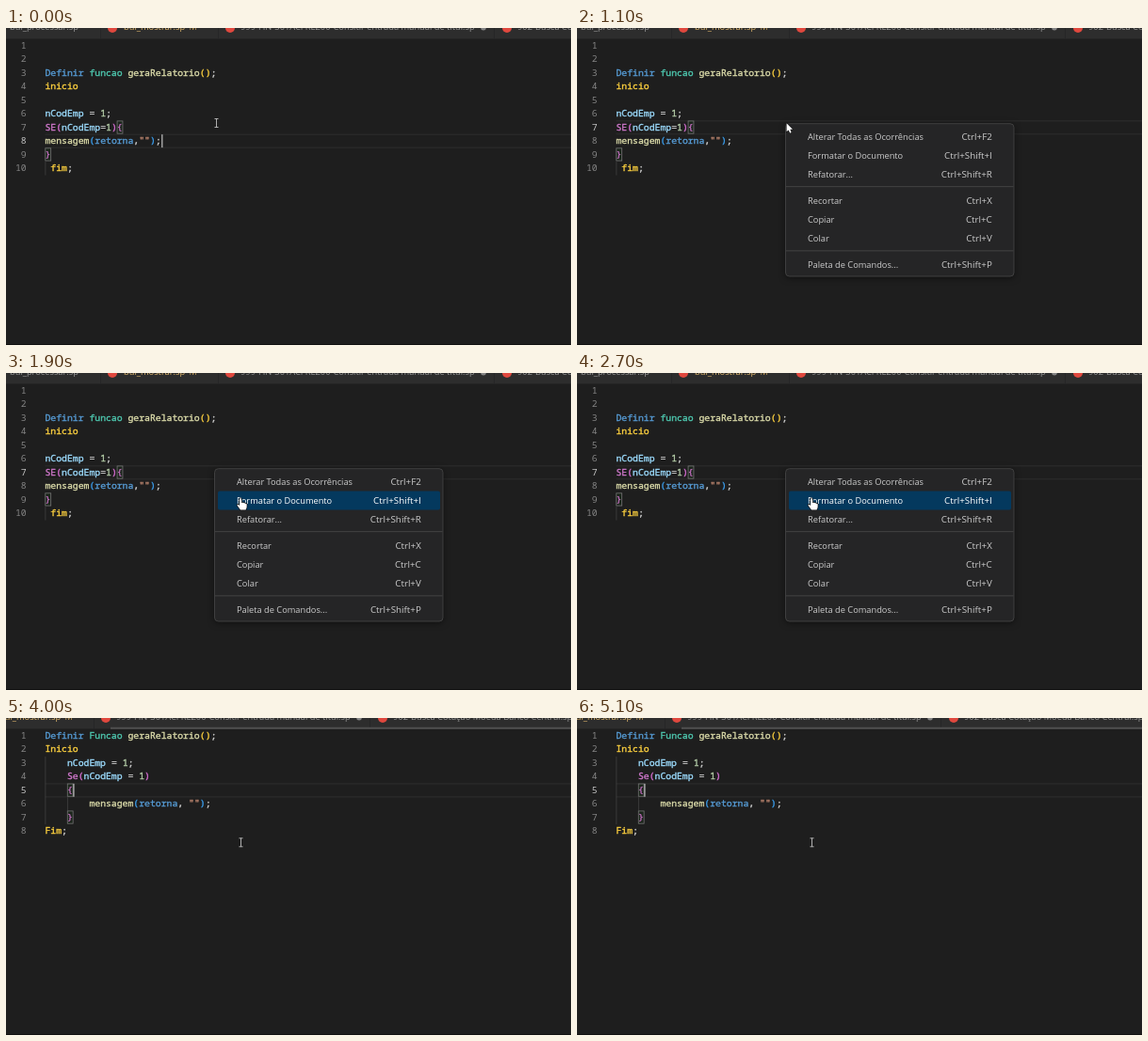
Write an HTML page with a canvas that moves like this. It is 600 by 337 pixels and loops after 5.2 s.

```html
<!DOCTYPE html>
<html lang="pt">
<head>
<meta charset="utf-8">
<style>
html, body { margin: 0; width: 100%; height: 100%; overflow: hidden; background: #1e1e1e; }
canvas { display: block; }
</style>
</head>
<body>
<canvas id="stage" width="600" height="337"></canvas>
<script>
const ctx = document.getElementById('stage').getContext('2d');
const LOOP = 5200, BLUR = 600, MENU_OPEN = 800, FORMAT = 2900;
const LEFT = 41.5, PITCH = 14.45, ADVANCE = 5.867;
const MONO = '9.78px "Noto Sans Mono", monospace';
const ui = size => `${size}px "Open Sans", "Noto Sans", sans-serif`;

const RAW = ['', '', 'Definir funcao geraRelatorio();', 'inicio', '', 'nCodEmp = 1;',
  'SE(nCodEmp=1){', 'mensagem(retorna,"");', '}', ' fim;'];
const TIDY = ['Definir Funcao geraRelatorio();', 'Inicio', '    nCodEmp = 1;',
  '    Se(nCodEmp = 1)', '    {', '        mensagem(retorna, "");', '    }', 'Fim;'];

const BRACKETS = ['#ffd23f', '#da70d6', '#3a9ff0'];
const RULES = [
  [/^(definir|retorna)$/i, '#569cd6'],
  [/^funcao$/i, '#4ec9b0'],
  [/^(geraRelatorio|mensagem)$/, '#dcdcaa'],
  [/^se$/i, '#d078cc'],
  [/^nCodEmp$/, '#9cdcfe'],
  [/^\d+$/, '#b5cea8'],
  [/^"/, '#ce9178'],
];

const MENU = [
  [115.6, 'Alterar Todas as Ocorrências', 'Ctrl+F2'],
  [135.6, 'Formatar o Documento', 'Ctrl+Shift+I'],
  [155.4, 'Refatorar...', 'Ctrl+Shift+R'],
  [183.5, 'Recortar', 'Ctrl+X'],
  [203.4, 'Copiar', 'Ctrl+C'],
  [223.2, 'Colar', 'Ctrl+V'],
  [251.2, 'Paleta de Comandos...', 'Ctrl+Shift+P'],
];

function rect(x, y, w, h, color) {
  ctx.fillStyle = color;
  ctx.fillRect(x, y, w, h);
}

function text(str, x, y, color, font, align = 'left') {
  ctx.font = font;
  ctx.fillStyle = color;
  ctx.textAlign = align;
  ctx.fillText(str, x, y);
}

// Code glyphs get a hairline outline for a slightly heavier weight
function codeText(str, x, y, color) {
  text(str, x, y, color, MONO);
  ctx.strokeStyle = color;
  ctx.lineWidth = 0.35;
  ctx.strokeText(str, x, y);
}

function dot(x, y, r, color) {
  ctx.fillStyle = color;
  ctx.beginPath();
  ctx.arc(x, y, r, 0, Math.PI * 2);
  ctx.fill();
}

function roundRect(x, y, w, h, r) {
  ctx.beginPath();
  ctx.roundRect(x, y, w, h, r);
}

const lineTop = n => 12 + (n - 1) * PITCH;
const columnX = c => LEFT + c * ADVANCE;

function drawTabs(scroll) {
  const font = ui(9.3), idle = '#969696', red = '#e0483e', base = 2;
  rect(0, 0, 600, 11.5, '#2d2d2d');
  ctx.save();
  ctx.translate(-scroll, 0);
  for (const x of [100, 225, 518]) rect(x, 0, 0.8, 11.5, '#252526');
  text('bul_processar.sp', 4, base, idle, font);
  text('bul_mostrar.sp', 125, base, '#dcb46c', font);
  text('M', 194.5, base, '#c09a58', font);
  text('999-FIN-301ACFREZ00-Consitir entrada manual de titul.sp', 249, base, idle, font);
  text('902-Busca Cotação Moeda Banco Central.sp', 543, base, idle, font);
  for (const x of [113, 238, 532]) dot(x, 0, 5, red);
  dot(507, -0.3, 2.8, '#858585');
  ctx.restore();
}

function drawCode(lines, active) {
  const top = lineTop(active);
  rect(LEFT, top - 0.5, 600 - LEFT, 1.2, '#2b2b2b');
  rect(LEFT, top + PITCH - 1, 600 - LEFT, 1.2, '#2b2b2b');
  let depth = 0;
  lines.forEach((line, i) => {
    const base = lineTop(i + 1) + 10;
    text(i + 1, 21.7, base, i + 1 === active ? '#c6c6c6' : '#858585', MONO, 'right');
    for (const { 0: token, index } of line.matchAll(/\w+|"[^"]*"|[^\s\w"]/g)) {
      let color = '#d4d4d4';
      const rule = RULES.find(([pattern]) => pattern.test(token));
      if (rule) color = rule[1];
      else if (/^(inicio|[({])$/i.test(token)) color = BRACKETS[depth++];
      else if (/^(fim|[)}])$/i.test(token)) color = BRACKETS[--depth];
      codeText(token, columnX(index), base, color);
    }
  });
}

function bracketBox(line, col) {
  const x = columnX(col), y = lineTop(line);
  rect(x, y, ADVANCE, PITCH - 1, 'rgba(0,100,0,.1)');
  ctx.strokeStyle = '#757575';
  ctx.lineWidth = 0.8;
  ctx.strokeRect(x + 0.3, y + 0.2, ADVANCE, PITCH - 1.2);
}

function guide(col, from, to) {
  rect(columnX(col), lineTop(from), 0.8, (to - from + 1) * PITCH, '#404040');
}

function caret(line, col) {
  rect(columnX(col) + 0.5, lineTop(line), 1.2, PITCH - 0.5, '#c0c0c0');
}

function drawMenu(selected) {
  ctx.save();
  ctx.shadowColor = 'rgba(0,0,0,.55)';
  ctx.shadowBlur = 7;
  ctx.shadowOffsetY = 1.5;
  ctx.fillStyle = '#252526';
  roundRect(221.5, 101.7, 242.5, 162.3, 4);
  ctx.fill();
  ctx.restore();
  ctx.strokeStyle = '#454545';
  ctx.lineWidth = 0.9;
  ctx.stroke();
  for (const y of [168.2, 236.4]) rect(222, y, 241.5, 0.9, '#454545');
  MENU.forEach(([y, label, keys], i) => {
    const on = i === selected;
    if (on) {
      ctx.fillStyle = '#04395e';
      roundRect(225, y - 10, 236, 19.8, 2);
      ctx.fill();
    }
    const color = on ? '#ffffff' : '#cccccc';
    text(label, 245, y + 3.4, color, ui(9.25));
    text(keys, 440.8, y + 3.4, color, ui(9.8), 'right');
  });
}

function drawPath(x, y, path, width) {
  ctx.save();
  ctx.translate(x, y);
  const shape = new Path2D(path);
  ctx.lineJoin = 'round';
  ctx.lineWidth = width;
  ctx.strokeStyle = '#000';
  ctx.stroke(shape);
  ctx.fillStyle = '#fff';
  ctx.fill(shape);
  ctx.restore();
}

const arrow = (x, y) => drawPath(x, y, 'M0 0V9L2.1 7.1L3.6 10.3L5.1 9.6L3.8 6.5H6.5Z', 1);

function hand(x, y) {
  drawPath(x, y, 'M-1 1Q0-.8 1 1V5Q2.2 4 3 5.3Q4.2 4.5 5 5.8Q6.7 5.2 6.7 7V9Q6.7 10.5 5.6 12.5H0L-3.2 8.2Q-4 6.7-2.6 6.6L-1 8Z', 1.2);
}

function ibeam(x, y) {
  ctx.strokeStyle = '#c0c0c0';
  ctx.lineWidth = 0.9;
  ctx.stroke(new Path2D(`M${x - 2} ${y - 4.5}H${x + 2}M${x} ${y - 4.5}V${y + 4.5}M${x - 2} ${y + 4.5}H${x + 2}`));
}

// Pointer stops: time, x, y
const STOPS = [[1100, 222.5, 101.3], [1500, 242, 122], [1800, 249, 133]];

function pointerAt(t) {
  if (t <= STOPS[0][0]) return STOPS[0].slice(1);
  for (let i = 1; i < STOPS.length; i++) {
    const [t0, x0, y0] = STOPS[i - 1], [t1, x1, y1] = STOPS[i];
    if (t < t1) {
      const k = (t - t0) / (t1 - t0);
      return [x0 + (x1 - x0) * k, y0 + (y1 - y0) * k];
    }
  }
  return STOPS[STOPS.length - 1].slice(1);
}

function drawRaw(t) {
  const menu = t >= MENU_OPEN;
  drawTabs(0);
  drawCode(RAW, menu ? 7 : 8);
  guide(0, 10, 10);
  if (t < BLUR || menu) {
    bracketBox(7, 13);
    bracketBox(9, 0);
  }
  if (t < 500) caret(8, 21);
  const [x, y] = pointerAt(t);
  if (menu) drawMenu(y < 106 ? -1 : y < 126 ? 0 : 1);
  if (t < BLUR) ibeam(223.5, 101);
  else if (y < 106) arrow(x, y);
  else hand(x, y);
}

function drawTidy(t) {
  drawTabs(132);
  rect(111, 9.8, 489, 2, '#4f4f4f'); // tab strip scrollbar
  drawCode(TIDY, 5);
  guide(0, 3, 7);
  guide(4, 6, 6);
  bracketBox(5, 4);
  bracketBox(7, 4);
  if ((t - FORMAT) % 1000 < 500) caret(5, 5);
  ibeam(249.5, 132.3);
}

function render(t) {
  rect(0, 0, 600, 337, '#1e1e1e');
  (t < FORMAT ? drawRaw : drawTidy)(t);
  rect(0, 336, 600, 1, '#101010');
}

const start = performance.now();
function tick() {
  render((performance.now() - start) % LOOP);
  requestAnimationFrame(tick);
}
tick();
</script>
</body>
</html>
```
